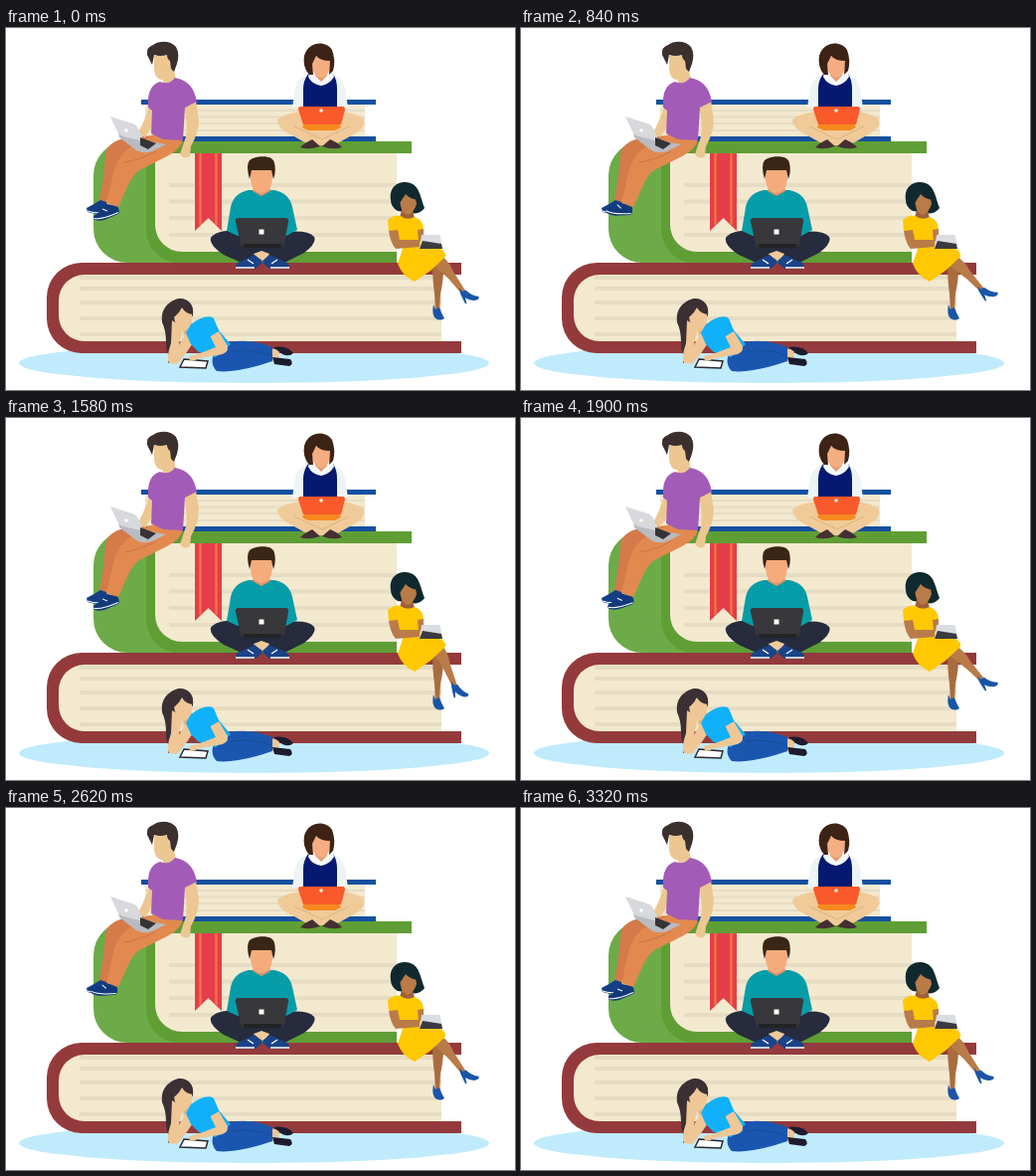
An HTML page for the animation above (3340 ms loop, 512 by 364 pixels).

```html
<!DOCTYPE html>
<html lang="en">
<head>
<meta charset="utf-8">
<title>Reading on books</title>
<style>
html,body{margin:0;width:100%;height:100%;overflow:hidden;background:#fff}
svg{display:block;width:100vw;height:100vh}
</style>
</head>
<body>
<svg viewBox="0 0 512 364">
<ellipse cx="249.500" cy="337" rx="236.500" ry="20" fill="#c0ebfc"/>

<!-- blue book -->
<path fill="#f3e9cf" d="M140 76H361V110H140Z"/>
<path stroke="#e6dcc4" stroke-width="2" d="M140 83H361M140 89.500H361M140 96H361M140 103H361"/>
<path fill="#1450a0" d="M136 72H372V77H136ZM136 109H372V114H136Z"/>

<!-- green book -->
<path fill="#6dab48" d="M393 114H122A34 34 0 0 0 88 148V202A34 34 0 0 0 122 236H393Z"/>
<path fill="#5f9e35" d="M408 114H160Q141 116 141 138V202A32 34 0 0 0 173 236H393V126H408Z"/>
<path fill="#f3e9cf" d="M393 126H150V198A27 27 0 0 0 177 225H393Z"/>
<path stroke="#e6dcc4" stroke-width="4" d="M164 158H393M164 174.500H393M164 191H393M164 208H393"/>
<path fill="#e53d49" d="M190 126H217V204L203.500 191L190 204Z"/>
<path stroke="#ef7145" stroke-width="2.500" d="M195.500 126V198M211.500 126V198"/>

<!-- red book -->
<path fill="#943a3c" d="M458 236H76A35 35 0 0 0 41 271V292A35 35 0 0 0 76 327H458V315H438V248H458Z"/>
<path fill="#f3e9cf" d="M438 248H79A26 26 0 0 0 53 274V289A26 26 0 0 0 79 315H438Z"/>
<path stroke="#e6dcc4" stroke-width="4" d="M74 251H438M74 262H438M74 276H438M74 292H438M74 308H438"/>

<!-- man with grey laptop -->
<g>
<path fill="#d57a49" d="M148 108L118 111Q100 116 100 129L98 150L94 174L104 178L112 150L125 125Z"/>
<path fill="#153f84" d="M81 181Q89 177 95 173L104 176L103 184Q92 189 82 185Z"/>
<path fill="none" stroke="#fff" d="M82 184Q92 187.500 102 184"/>
<g id="foot">
<path fill="#ecc792" d="M101 173L111 176L110 182L102 181Z"/>
<path fill="#123a7b" d="M88 189Q95 185 101 177L112 179Q115 184 113 187L99 193Q91 195 88 192Z"/>
<path fill="none" stroke="#fff" d="M88.500 191.500Q96 193 113 185.500M97 182L102 184"/>
</g>
<path fill="#e2894f" d="M150 106L178 112Q176 122 162 129L134 143Q127 148 122 160L113 180L101 176L107 150Q110 132 122 122Z"/>
<path fill="none" stroke="#c97449" d="M119 135Q134 133 151 124"/>
<path fill="#ecc792" d="M144 80L151 77L148 97L140 110L132 107L138 95Z"/>
<path fill="#ecc792" d="M179 77L191 73L194 92Q194 105 186 119L185 129Q180 133 175 127L181 109Q183 97 179 77ZM156 45L169 42L172 57L159 60Z"/>
<path fill="#a35bb8" d="M155 54C146 57 142 64 143 80L147 83L146 106L158 112L178 113L180 80L192 74C189 60 184 53 170 50Q164 58 155 54Z"/>
<path fill="#ecc792" d="M149 28V42Q150 51 156 52Q163 52 168 42L167 27Z"/>
<path fill="#3b302e" d="M147 37L142 27Q141 19 148 17C155 12 166 13 171 19Q175 26 172 36L169 44L166 41L165 33Q162 31 162 27Q155 29 149 27Z"/>
<path fill="#b8bbc0" d="M113 105L139 113L161 117L147 124Q138 127 131 123L114 110Z"/>
<path fill="#d7d9dc" d="M105 89L127 96Q131 97 133 101L139 114L118 109Q114 108 112 104Z"/>
<path fill="#343436" d="M135 110L151 116L143 122L135 118Z"/>
<circle cx="121" cy="103" r="1.800" fill="#fff"/>
</g>

<!-- boy with orange laptop -->
<g>
<path fill="#f0ca98" d="M298 84Q279 86 273 92Q273 101 288 108L306 118H330L353 105Q362 100 360 91Q350 85 337 84Z"/>
<path fill="none" stroke="#dab584" d="M290 99L318 112L345 99"/>
<path fill="#443033" d="M308 112Q301 115 296 120Q304 123 316 119ZM326 112Q334 115 338 120Q329 123 318 119Z"/>
<path fill="#edf4f6" d="M304 47Q293 50 291 60L288 80H344L341 60Q338 50 329 47Z"/>
<path fill="#04196f" d="M304 46Q299 53 299 61V80H333V61Q333 52 329 46L317 58Z"/>
<path fill="#f4f8fa" d="M305 45H329L330 49Q325 57 317 58Q308 57 304 49Z"/>
<path fill="#e99a6e" d="M311 42H323V48L317 54L311 48Z"/>
<path fill="#f5ad82" d="M308 29Q307 43 311 47Q317 53 323 47Q327 41 326 28Z"/>
<path fill="#3d2316" d="M305 47Q298 39 300 28C304 13 322 12 328 22Q332 33 329 43L325 47L326 33Q316 33 312 28L308 36L309 47Z"/>
<path fill="#f6891f" d="M300 96H335L337 100L331 103H304L298 100Z"/>
<path fill="#f9592b" d="M296 79H339Q341 79 341 82L337 97H299L294 82Q294 79 296 79Z"/>
<circle cx="317" cy="83" r="1.800" fill="#fff0df"/>
</g>

<!-- man with black laptop -->
<g>
<path fill="#262b3d" d="M231 203Q210 204 206 211Q204 218 219 228L239 237L258 230L276 238L300 226Q313 216 310 210Q304 203 282 205Z"/>
<path fill="#069ca8" d="M244 163Q229 166 226 180L222 204L233 209H282L293 203L288 180Q285 166 270 163Z"/>
<path fill="#e0946a" d="M250 156H264L266 164L257 169L248 164Z"/>
<path fill="#f5ab7c" d="M246 143Q245 158 250 163Q257 169 264 163Q269 157 268 143L261 139H251Z"/>
<path fill="#3a2617" d="M245 152Q241 138 245 133C252 128 269 127 270 136Q272 144 269 152L267 143H247Z"/>
<path fill="#f0ca98" d="M249 227L257 224L265 227L261 234H253Z"/>
<path fill="#1b4388" d="M250 228L259 235L251 242H234Q229 240 233 236ZM265 228L257 235L265 242H282Q287 240 283 236Z"/>
<path fill="none" stroke="#fff" stroke-width="1.300" d="M231 241H250M266 241H285M243 233L249 237M273 233L267 237"/>
<path fill="#38383b" d="M234 191H281Q285 191 284 195L280 217Q279 220 276 220H240Q237 220 236 217L231 195Q230 191 234 191Z"/>
<path fill="#222325" d="M238 217H278L276 221H240Z"/>
<path fill="#fff" d="M254.500 202.500h5v5h-5Z"/>
</g>

<!-- seated woman -->
<g>
<path fill="#a96c3f" d="M429 238L440 231Q441 251 437 267L436 284L432 285L431 267Q429 254 429 238Z"/>
<path fill="#1955a7" d="M430 278Q428 288 432 292Q437 295 441 292Q438 287 436 281L432 283Z"/>
<g id="leg">
<path fill="#b97b48" d="M429 237L439 230Q446 235 450 245L462 264L458 267L446 253Q438 245 429 237Z"/>
<path fill="#1955a7" d="M456 261.500L459 265L462.500 263.500Q468 269 475.500 270Q476.500 273.500 471 274Q465 273.500 462 271L463.500 277.500L461.500 276.500L457 267Z"/>
</g>
<path fill="#10292f" d="M387 173C385 157 398 153 407 156C416 159 417 171 421 181Q416 188 408 186L394 184Q387 180 387 173Z"/>
<path fill="#9c6138" d="M399 180H408L411 191L402 195L396 190Z"/>
<path fill="#b97b48" d="M396 170Q396 184 403 188Q410 187 413 177L411 166L402 163Z"/>
<path fill="#10292f" d="M392 172Q395 157 408 158Q416 162 415 173Q406 172 402 167L396 176Z"/>
<path fill="#ffc800" d="M384 193Q391 187 397 189Q403 194 411 190Q420 193 420 203L418 218L437 222Q443 225 442 230L427 244L411 255Q399 250 394 237L399 222L392 205L385 204Z"/>
<path fill="#b97b48" d="M385 204L394 203L396 213L416 213V220L392 222Q387 217 385 204ZM414 203L420 202V213L415 215Z"/>
<path fill="#d9dce0" d="M418 208H435Q437 208 437 210L439 222L416 221Z"/>
<path fill="#3b3b40" d="M419 214L438 217L439 222L416 222Z"/>
</g>

<!-- lying woman -->
<g>
<path fill="#efc796" d="M262 321L275 324L274 336L262 335Z"/>
<path fill="#1a56b0" d="M209 328L225 316Q246 312 268 321V335L252 340Q226 347 212 345Q205 338 209 328Z"/>
<path fill="none" stroke="#154c92" d="M226 325Q247 322 266 329"/>
<path fill="#1d1b2e" d="M269 321Q283 319 289 327Q285 331 278 328ZM268 331L286 333Q290 338 285 340L270 338Z"/>
<path fill="#3b3033" d="M168 274C179 268 190 276 188 289L181 300Q173 303 172 318L168 336L163 337L164 329Q161 326 161 316Q161 304 157 296Q155 281 168 274Z"/>
<path fill="#dfb27c" d="M176 300L187 296L190 309L181 313Z"/>
<path fill="#efc796" d="M181 306L190 314L179 330L172 338L164 337Z"/>
<path fill="#10b1f8" d="M185 299Q198 288 208 291L214 304L226 318L211 331L194 326L186 318L181 307Z"/>
<path fill="#efc796" d="M169 287Q169 300 176 305Q184 306 187 294L187 281L176 280Z"/>
<path fill="#3b3033" d="M166 291Q166 274 178 273Q189 275 188 288Q180 287 177 281Q174 287 170 290Z"/>
<path fill="#efc796" d="M167 294Q173 297 177 305L174 318L173 337L164 337Q161 331 166 317Z"/>
<path fill="#efc796" d="M205 309L214 305L223 320Q224 328 213 329L190 333L185 331L198 326L211 321Z"/>
<path fill="#10b1f8" d="M198 296L209 292L214 305L204 311Z"/>
<path fill="#fff" stroke="#292931" stroke-width="1.500" d="M179 333L203 335L201 342L175 341Z"/>
<path fill="#efc796" d="M184 330L195 327L191 334L185 335Z"/>
</g>
</svg>
<script>
const LOOP = 3340;
const leg = document.getElementById('leg');
const foot = document.getElementById('foot');

// time in ms, swing in degrees
const swing = [[0, 0], [520, 16.5], [1090, -0.5], [1605, -14], [1930, 6.8], [2180, 6.3], [2680, 0], [LOOP, 0]];

function pose(t) {
  let i = 1;
  while (swing[i][0] < t) i++;
  const [t0, a] = swing[i - 1], [t1, b] = swing[i];
  return a + (b - a) * (1 - Math.cos(Math.PI * (t - t0) / (t1 - t0))) / 2;
}

function draw(t) {
  const tap = 10 * (1 - Math.cos(4 * Math.PI * t / LOOP));
  leg.setAttribute('transform', `rotate(${-pose(t)} 440 232)`);
  foot.setAttribute('transform', `rotate(${tap} 109 179)`);
}

const start = performance.now();
function tick() {
  draw((performance.now() - start) % LOOP);
  requestAnimationFrame(tick);
}
tick();
</script>
</body>
</html>
```
